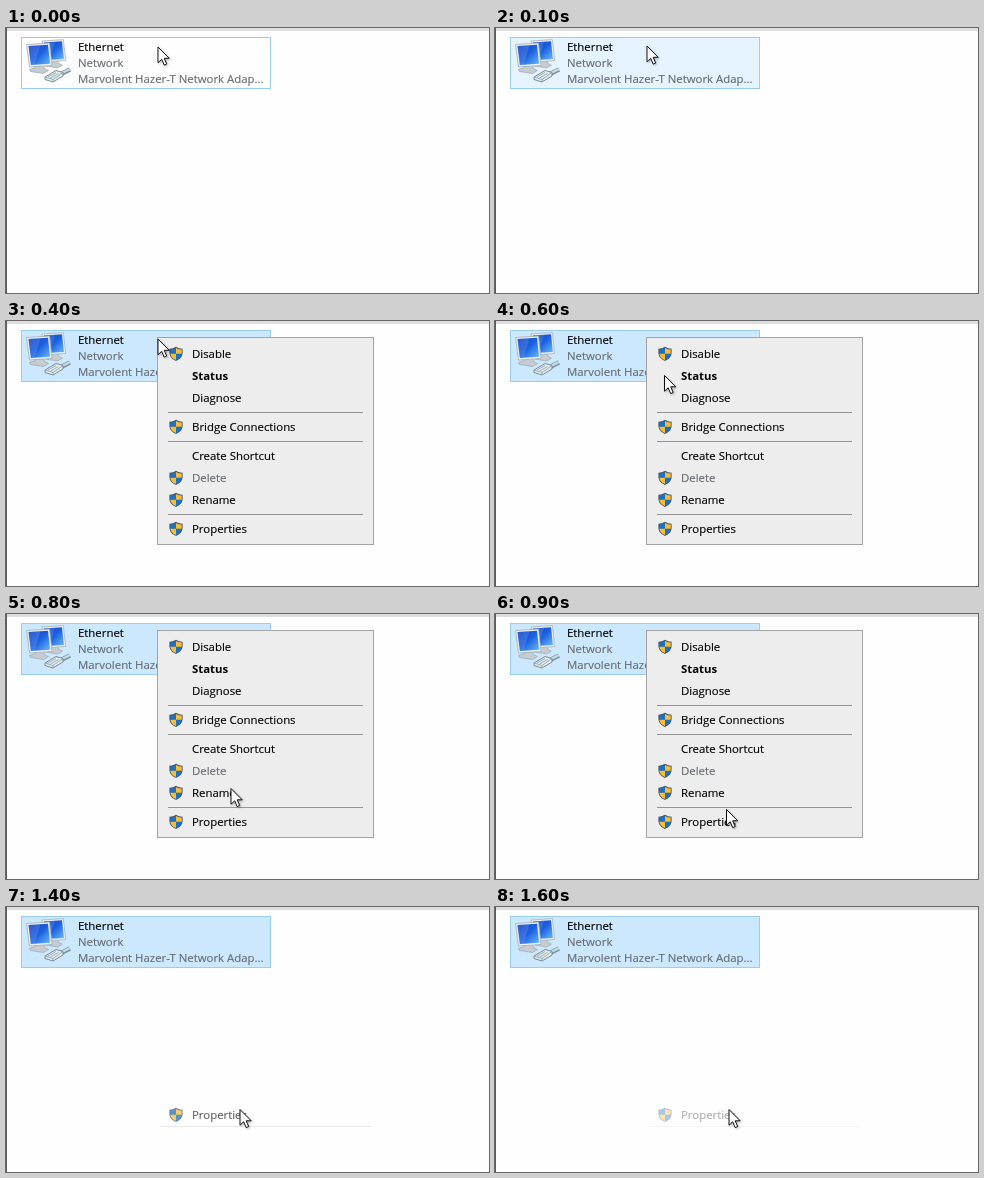
An HTML page that plays this animation: 483x265 px, repeating every 1700 ms.

```html
<!DOCTYPE html>
<html lang="en">
<head>
<meta charset="utf-8">
<title>Adapter context menu</title>
<style>
html, body { margin: 0; width: 100%; height: 100%; overflow: hidden; background: #fefefe; }
svg { display: block; width: 483px; height: 265px; }
text { font: 11.4px "Open Sans", "Noto Sans", sans-serif; fill: #000; stroke: #000; stroke-width: .15; white-space: pre; }
.muted { fill: #666b70; stroke: #666b70; }
.strong { font-weight: 700; stroke: none; }
</style>
</head>
<body>
<svg viewBox="0 0 483 265">
  <defs>
    <linearGradient id="screen" x2="1" y2="1">
      <stop offset="0" stop-color="#0f3fc4"/>
      <stop offset=".5" stop-color="#1c62e0"/>
      <stop offset="1" stop-color="#6cbcf8"/>
    </linearGradient>
    <g id="monitor">
      <path d="M9 20L17 21L18 24L22 26L17 29L4 27L3 25L9 23Z" fill="#c6ccd1" stroke="#949da4" stroke-width=".6"/>
      <path d="M0 0L23 -1.5L25.5 21L3 22.5Z" fill="#edf1f3" stroke="#a4aeb5" stroke-width=".8"/>
      <path d="M2 1.6L21.5 .3L23.6 19.3L4.4 20.5Z" fill="url(#screen)"/>
      <path d="M2 1.6L14 .8L8 20.2L4.4 20.5Z" fill="#fff" opacity=".13"/>
    </g>
    <g id="shield">
      <path d="M7 .3Q10 2.2 13.6 2.2V7Q13 12 7 14.5Q1 12 .4 7V2.2Q4 2.2 7 .3Z" fill="#46566a"/>
      <path d="M7 1.4V7.2H1.3V3.1Q4.5 3 7 1.4ZM7 7.2H12.7Q12 11.4 7 13.6Z" fill="#1972c8"/>
      <path d="M7 1.4V7.2H12.7V3.1Q9.5 3 7 1.4ZM7 7.2H1.3Q2 11.4 7 13.6Z" fill="#f8bd32"/>
    </g>
    <filter id="soft" x="-50%" y="-50%" width="200%" height="200%">
      <feDropShadow dx="1" dy="1" stdDeviation=".8" flood-opacity=".3"/>
    </filter>
  </defs>

  <rect width="483" height="265" fill="#fefefe"/>
  <rect width="483" height="3" fill="#dedede"/>
  <rect width="1" height="265" fill="#5c5c5c"/>

  <rect id="tile" x="15.5" y="9.5" width="249" height="51" stroke="#99cfee"/>
  <use href="#monitor" transform="translate(36 13) scale(.93)"/>
  <use href="#monitor" transform="translate(20.5 16.5)"/>
  <g stroke-linejoin="round">
    <path d="M53 47L64 41.5" stroke="#7b929d" stroke-width="4.5"/>
    <path d="M53 46.5L64 41" stroke="#c5dce5" stroke-width="2.5"/>
    <path d="M39 49L50 42.5L57 44.5V48L47 54L39 51.5Z" fill="#e5eced" stroke="#71818a" stroke-width=".9"/>
    <path d="M39 49L47 51.5L57 44.5M47 51.5V54M42 49L50 44.5M44.5 50L52.5 45.5" fill="none" stroke="#82a3b0" stroke-width=".8"/>
  </g>
  <text x="72" y="23">Ethernet</text>
  <text x="72" y="39" class="muted">Network</text>
  <text x="72" y="55" class="muted">Marvolent Hazer-T Network Adap...</text>

  <g id="menu">
    <rect x="151.5" y="16.5" width="216" height="207" fill="#eeedee" stroke="#a3a3a3"/>
    <rect id="hover" x="154" y="197" width="211" height="22" fill="#fdfdfd"/>
    <path d="M162 91.5H357M162 120.5H357M162 193.5H357" stroke="#949494"/>
    <g id="items"></g>
  </g>

  <g id="ghost">
    <path d="M154 219.5H366" stroke="#e9ebef"/>
    <use href="#shield" x="163" y="200.5" opacity=".75"/>
    <text x="186" y="212" opacity=".62">Properties</text>
  </g>

  <path id="cursor" d="M.5 .5V16.2L4.2 12.8L6.7 18.6L9.2 17.5L6.7 11.8H11.7Z"
        fill="#fff" stroke="#111" filter="url(#soft)"/>
</svg>
<script>
const LOOP = 1700, STEP = 100;
const $ = id => document.getElementById(id);
const show = (id, on) => $(id).setAttribute("visibility", on ? "visible" : "hidden");

// label, baseline, has shield, text style
const entries = [
  ["Disable", 37, true, ""],
  ["Status", 59, false, "strong"],
  ["Diagnose", 81, false, ""],
  ["Bridge Connections", 110, true, ""],
  ["Create Shortcut", 139, false, ""],
  ["Delete", 161, true, "muted"],
  ["Rename", 183, true, ""],
  ["Properties", 212, true, ""]
];
$("items").innerHTML = entries.map(([label, y, shield, style]) =>
  (shield ? `<use href="#shield" x="163" y="${y - 11.5}"/>` : "") +
  `<text x="186" y="${y}" class="${style}">${label}</text>`).join("");

// time, x, y of the pointer tip
const pointer = [
  [0, 151.5, 18.5],
  [100, 151.5, 17.5],
  [600, 169, 54],
  [700, 199, 116],
  [800, 224.5, 174],
  [900, 231, 195],
  [1000, 233.5, 202]
];

function draw(ms) {
  const t = Math.floor(ms / STEP) * STEP;
  const [, x, y] = pointer.findLast(([start]) => start <= t);
  $("cursor").setAttribute("transform", `translate(${x} ${y})`);

  $("tile").setAttribute("fill", t < 100 ? "#fefefe" : t < 200 ? "#e5f3ff" : "#cce8ff");
  show("menu", t >= 400 && t < 1400);
  show("hover", t >= 1000 && t < 1400);

  const fade = (t - 1400) / 200;
  show("ghost", fade >= 0);
  $("ghost").setAttribute("opacity", 1 - 0.5 * Math.max(0, fade));
}

const origin = performance.now();
function tick() {
  draw((performance.now() - origin) % LOOP);
  requestAnimationFrame(tick);
}
tick();
</script>
</body>
</html>
```
